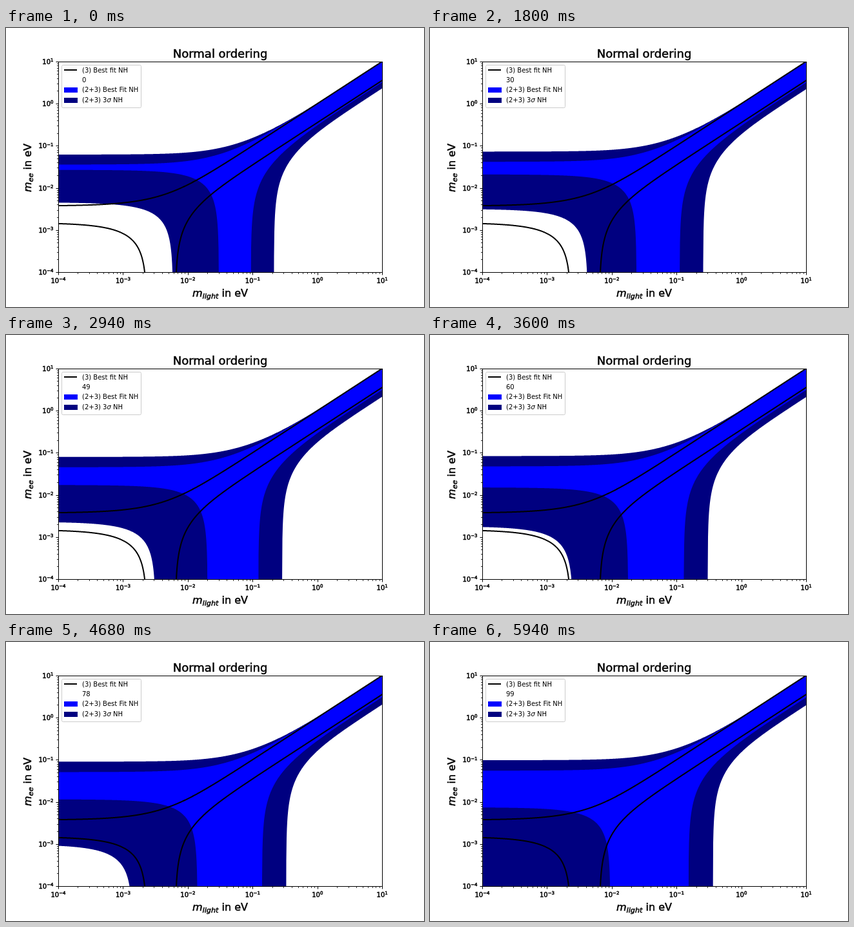
Recreate the animation shown at these times as an HTML page. Size 648 by 432 pixels, loop 6000 ms.

```html
<!DOCTYPE html>
<html lang="en">
<head>
<meta charset="utf-8">
<title>Normal ordering</title>
<style>
  html, body { margin: 0; width: 100%; height: 100%; overflow: hidden; background: #fff; }
  svg { display: block; width: 648px; height: 432px; font-family: "DejaVu Sans", sans-serif; }
  .heavy { stroke: #000; stroke-width: .5px; }
  .it { font-style: oblique; }
  text { white-space: pre; }
</style>
</head>
<body>
<svg viewBox="0 0 648 432" xmlns="http://www.w3.org/2000/svg">
  <clipPath id="area"><rect x="81" y="52" width="503" height="327"/></clipPath>
  <g clip-path="url(#area)">
    <path id="outer" fill="#000080"/>
    <path id="inner" fill="#0000ff"/>
    <path id="lines" fill="none" stroke="#000" stroke-width="2" stroke-linejoin="round"/>
  </g>
  <g id="axes" stroke="#000">
    <rect x="81.5" y="52.5" width="502" height="326" fill="none"/>
  </g>
  <g id="labels" class="heavy">
    <text x="332.1" y="46" font-size="18" text-anchor="middle">Normal ordering</text>
    <text x="289" y="416" font-size="16"><tspan class="it">m</tspan><tspan class="it" font-size="11.2" dy="2.6">light</tspan><tspan dy="-2.6"> in eV</tspan></text>
    <text transform="translate(39 254) rotate(-90)" font-size="16"><tspan class="it">m</tspan><tspan class="it" font-size="11.2" dy="2.6">ee</tspan><tspan dy="-2.6"> in eV</tspan></text>
  </g>
  <g font-size="10">
    <rect x="86.5" y="57.5" width="123" height="66" rx="2" fill="#fff" stroke="#ccc"/>
    <path d="M90 65H110" stroke="#000" stroke-width="2"/>
    <rect x="90" y="92" width="21" height="8" fill="#0000ff"/>
    <rect x="90" y="108" width="21" height="8" fill="#000080"/>
    <text x="118" y="69">(3) Best fit NH</text>
    <text x="118" y="84" id="count">0</text>
    <text x="118" y="99">(2+3) Best Fit NH</text>
    <text x="118" y="115">(2+3) 3<tspan class="it">σ</tspan> NH</text>
  </g>
</svg>
<script>
const STEP = 60, STEPS = 100;
const LEFT = 81, RIGHT = 583.2, BOTTOM = 378, DX = 100.44, DY = 65.232;
const M4 = 1.3, M5 = 1.4;
const $ = id => document.getElementById(id);

const xOf = e => LEFT + (e + 4) * DX;
const yOf = e => BOTTOM - (e + 4) * DY;
const yVal = v => yOf(Math.log10(Math.max(v, 1e-6)));

// Mass terms of the three light states for given mixing angles
const light = (s12, s13) => m => {
  const t1 = (1 - s12) * (1 - s13) * m;
  const t2 = s12 * (1 - s13) * Math.hypot(m, Math.sqrt(7.5e-5));
  const t3 = s13 * Math.hypot(m, Math.sqrt(2.524e-3));
  return { sum: t1 + t2 + t3, diff: t1 - t2 - t3, gap: t2 - t1 - t3 };
};
const best = light(.307, .0222);
const wide = light(.34, .024);

// Two heavy states with mixings u4 and u5
const heavy = (u4, u5) => ({
  rest: 1 - u4 - u5,
  plus: m => u4 * Math.hypot(m, M4) + u5 * Math.hypot(m, M5),
  minus: m => u4 * Math.hypot(m, M4) - u5 * Math.hypot(m, M5)
});
const upper = (l, h) => m => h.rest * l(m).sum + h.plus(m);
const leftEdge = (l, h) => m => h.minus(m) - h.rest * l(m).sum;
const rightEdge = (l, h) => m => h.rest * l(m).diff - h.plus(m);
const larger = (f, g) => m => Math.max(f(m), g(m));

const masses = [];
for (let x = LEFT; x <= RIGHT + 1; x += .5) masses.push(10 ** ((x - LEFT) / DX - 4));

const trace = f => masses.map((m, i) => (LEFT + i * .5) + " " + yVal(f(m)).toFixed(2));
const band = (hi, lo) => "M" + trace(hi).concat(trace(lo).reverse()).join("L") + "Z";

function draw(k) {
  const mid = heavy(.024, (.0008 + .000196 * k) / M5);
  const low = heavy(.00646, (.00018 + .0000457 * k) / M5);
  const high = heavy(.0435, (.0012 + .000363 * k) / M5);
  $("outer").setAttribute("d", band(upper(wide, high), larger(leftEdge(best, low), rightEdge(wide, high))));
  $("inner").setAttribute("d", band(upper(best, mid), larger(leftEdge(best, mid), rightEdge(best, mid))));
  $("count").textContent = k;
}

function drawLines() {
  const curves = [m => best(m).sum, larger(m => best(m).gap, m => best(m).diff)];
  $("lines").setAttribute("d", curves.map(f => "M" + trace(f).join("L")).join(""));
}

function add(parent, tag, attrs, text) {
  const el = document.createElementNS("http://www.w3.org/2000/svg", tag);
  for (const key in attrs) el.setAttribute(key, attrs[key]);
  if (text !== undefined) el.textContent = text;
  parent.append(el);
  return el;
}

function power(e, x, y, anchor) {
  const t = add($("labels"), "text", { x, y, "font-size": 10, "text-anchor": anchor });
  add(t, "tspan", {}, "10");
  add(t, "tspan", { "font-size": 7, dy: -3.8 }, String(e).replace("-", "\u2212"));
}

function drawTicks() {
  const snap = v => Math.floor(v + .5) + .5;
  const tick = (e, len, w) => add($("axes"), "path", {
    d: `M${snap(xOf(e))} 379v${len}M81 ${snap(yOf(e))}h${-len}`, "stroke-width": w
  });
  for (let e = -4; e <= 1; e++) {
    tick(e, 3.5, 1);
    power(e, xOf(e), 395, "middle");
    power(e, 73.5, yOf(e) + 4, "end");
    if (e < 1) for (let n = 2; n < 10; n++) tick(e + Math.log10(n), 2, .8);
  }
}

drawLines();
drawTicks();
draw(0);

let shown = 0;
const start = performance.now();
function frame() {
  const k = Math.floor(Math.max(0, performance.now() - start) / STEP) % STEPS;
  if (k !== shown) draw(shown = k);
  requestAnimationFrame(frame);
}
requestAnimationFrame(frame);
</script>
</body>
</html>
```
